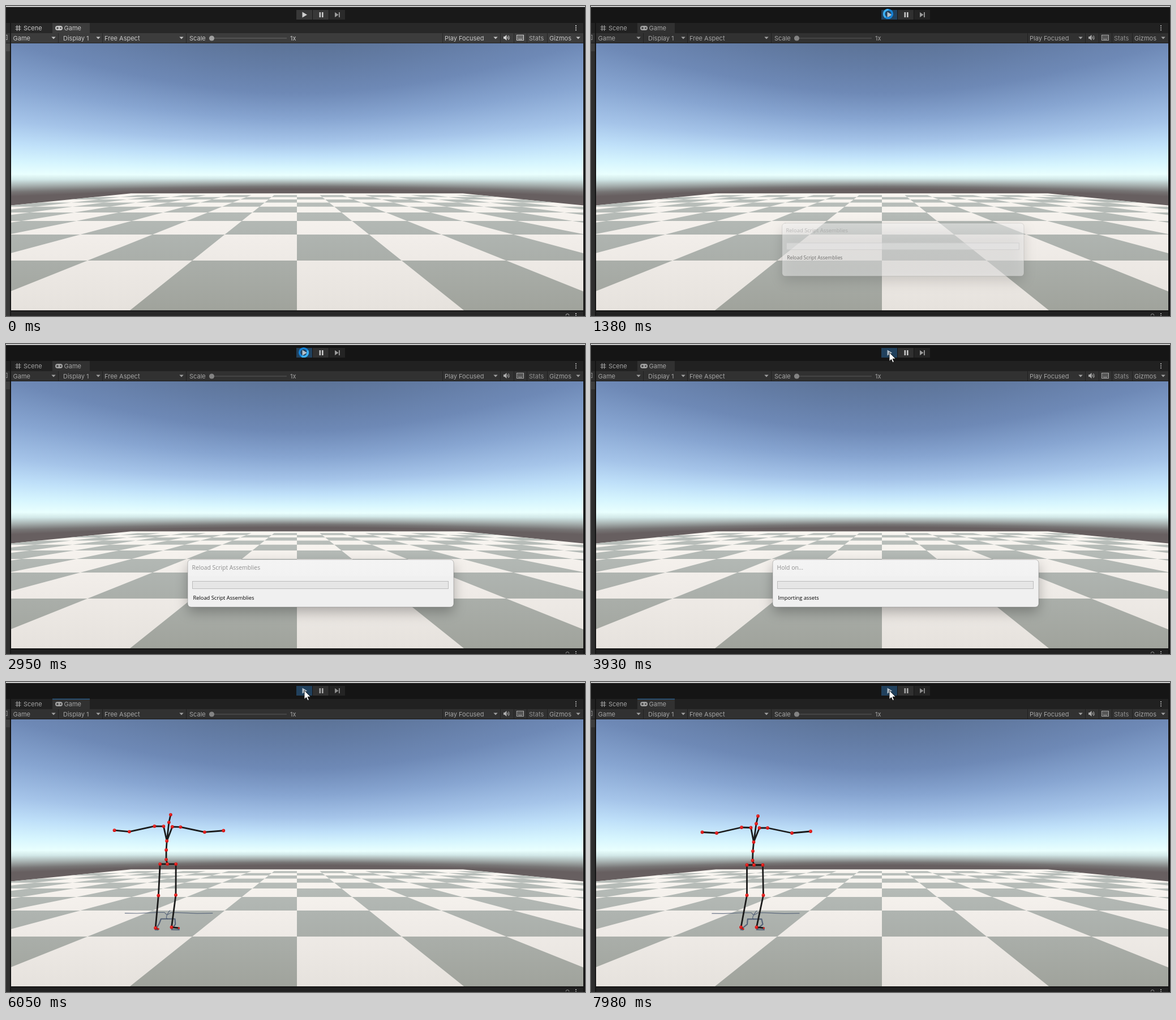
Recreate the animation shown at these times as an HTML page with a canvas. Size 1023x548 px, loop 8 s.

```html
<!DOCTYPE html>
<html lang="en">
<head>
<meta charset="utf-8">
<title>Game view</title>
<style>
html, body { margin: 0; width: 100%; height: 100%; overflow: hidden; background: #191919; }
canvas { display: block; }
</style>
</head>
<body>
<canvas id="stage" width="1023" height="548"></canvas>
<script>
const W = 1023, H = 548, LOOP = 8000;
const VIEW = { x: 9, y: 66, w: 1011, h: 472 };
const CX = 514, HORIZON = 302, FOCAL = 409;
const UI_FONT = '11px Inter, "Liberation Sans", sans-serif';
const ctx = document.getElementById('stage').getContext('2d');

const clamp = v => Math.max(0, Math.min(1, v));
const mix = (a, b, p) => a + (b - a) * p;
const smooth = p => p * p * (3 - 2 * p);

function rect(g, x, y, w, h, color) {
  g.fillStyle = color;
  g.fillRect(x, y, w, h);
}

function poly(g, points, color) {
  g.beginPath();
  points.forEach(([x, y]) => g.lineTo(x, y));
  g.closePath();
  g.fillStyle = color;
  g.fill();
}

function disc(g, x, y, r, color) {
  g.beginPath();
  g.arc(x, y, r, 0, 7);
  g.fillStyle = color;
  g.fill();
}

function text(g, str, x, y, color = '#c8c8c8', font = UI_FONT) {
  g.font = font;
  g.fillStyle = color;
  g.fillText(str, x, y);
}

function vertical(g, y0, y1, stops) {
  const grad = g.createLinearGradient(0, y0, 0, y1);
  stops.forEach(([y, c]) => grad.addColorStop(y, c));
  return grad;
}

// Sky: each column is the middle one stretched about the horizon.
const SKY = [
  [66, '#5c7397'], [110, '#647da6'], [154, '#6e89b6'], [200, '#87a5d1'],
  [240, '#a5c4e9'], [265, '#bfe0f9'], [285, '#d6f5fe'], [299, '#e9fffe'],
  [305, '#d2e8e8'], [312, '#a7b1b0'], [319, '#777575'], [324, '#675f60'], [362, '#675f60']
].map(([y, c]) => [(y - 66) / 296, c]);

function drawSky(g) {
  for (let x = VIEW.x; x < VIEW.x + VIEW.w; x++) {
    const s = Math.hypot(FOCAL, x - CX) / FOCAL;
    g.fillStyle = vertical(g, HORIZON - 236 * s, HORIZON + 60 * s, SKY);
    g.fillRect(x, VIEW.y, 1, VIEW.h);
  }
}

function drawFloor(g) {
  const light = vertical(g, 331, 538, [[0, '#f9f6f1'], [0.4, '#f1ede9'], [1, '#e6e2dd']]);
  const dark = vertical(g, 331, 538, [[0, '#bac0bc'], [0.4, '#aeb3af'], [1, '#a0a39c']]);
  const depth = n => 1 / (0.006757 + 0.00304 * n);
  const at = (col, d) => [CX + col * 1.25 * d, HORIZON + d];
  poly(g, [at(-8, depth(9)), at(8, depth(9)), at(8, depth(-1)), at(-8, depth(-1))], light);
  for (let row = 0; row < 9; row++) {
    const near = depth(row - 1), far = depth(row);
    for (let col = -8; col < 8; col++)
      if ((row + col) & 1)
        poly(g, [at(col, far), at(col + 1, far), at(col + 1, near), at(col, near)], dark);
  }
}

function caret(g, x, y = 54.5) {
  poly(g, [[x - 3.7, y], [x + 3.7, y], [x, y + 4]], '#c4c4c4');
}

function menuDots(g, x, y) {
  for (let i = 0; i < 3; i++) rect(g, x - 1, y + i * 3.7, 2, 2, '#c4c4c4');
}

function drawTabIcons(g) {
  g.strokeStyle = '#c4c4c4';
  g.lineWidth = 1.2;
  g.beginPath();
  for (const d of [-2, 2]) {
    g.moveTo(21.5 + d, 34); g.lineTo(21.5 + d, 44);
    g.moveTo(16.5, 39 + d); g.lineTo(26.5, 39 + d);
  }
  g.stroke();
  g.beginPath();
  g.roundRect(87, 35, 13, 8, 4);
  g.fillStyle = '#c4c4c4';
  g.fill();
  rect(g, 89, 38.4, 4, 1.2, '#3c3c3c');
  rect(g, 90.4, 37, 1.2, 4, '#3c3c3c');
  disc(g, 96.5, 39, 1.3, '#3c3c3c');
}

function drawToolIcons(g) {
  poly(g, [[879, 54], [881, 54], [884.5, 51], [884.5, 61], [881, 58], [879, 58]], '#d0d0d0');
  g.strokeStyle = '#d0d0d0';
  g.lineWidth = 1.1;
  for (const r of [2.3, 4.6]) {
    g.beginPath();
    g.arc(884.5, 56, r, -0.9, 0.9);
    g.stroke();
  }
  g.strokeRect(902.5, 51.5, 12, 9);
  for (let y = 53; y < 58; y += 2)
    for (let x = 904; x < 914; x += 2.3) rect(g, x, y, 1.3, 1.2, '#c4c4c4');
  rect(g, 905, 58.4, 7, 1, '#c4c4c4');
}

function drawChrome(g) {
  rect(g, 0, 0, W, VIEW.y, '#191919');
  rect(g, 0, 0, W, 1.6, '#f0f0f0');
  rect(g, 0, 30, 7, 18, '#282828');
  rect(g, 9, 30, 1011, 18, '#282828');
  rect(g, 82, 30, 66, 18, '#3c3c3c');
  rect(g, 0, 48, 7, H - 48, '#383838');
  rect(g, 0, 66, 7, 14, '#4a4a4a');
  rect(g, 0, 65, 7, 1, '#202020');
  rect(g, 7, 30, 2, H - 30, '#191919');
  rect(g, 9, 48, 1011, 17, '#3c3c3c');
  rect(g, 9, 65, 1011, 1, '#232323');
  rect(g, 1020, 30, 3, H - 30, '#191919');
  rect(g, 9, 538, 1011, 2, '#191919');
  rect(g, 9, 540, 1011, 8, '#282828');
  for (const x of [92, 170, 318, 771, 873, 897, 920, 956]) rect(g, x, 48, 1, 17, '#272727');

  g.strokeStyle = '#b0b0b0';
  g.lineWidth = 1;
  g.strokeRect(-3, 51.5, 5, 8);
  g.beginPath();
  g.arc(992, 547, 2.8, Math.PI, 0);
  g.stroke();
  menuDots(g, 1007, 543);
  menuDots(g, 1007, 34);

  drawTabIcons(g);
  text(g, 'Scene', 31, 43);
  text(g, 'Game', 102.5, 43);
  const labels = [['Game', 12.5], ['Display 1', 101], ['Free Aspect', 174], ['Scale', 324], ['1x', 502],
    ['Play Focused', 775], ['Stats', 924], ['Gizmos', 960]];
  labels.forEach(([s, x]) => text(g, s, x, 60.5, s === 'Stats' ? '#b0b0b0' : '#c8c8c8'));
  [84, 163, 310, 865, 1011].forEach(x => caret(g, x));
  rect(g, 363, 56.3, 133, 1.2, '#646464');
  disc(g, 363.5, 57, 4.6, '#a0a0a0');
  drawToolIcons(g);
}

function makeBackground() {
  const layer = document.createElement('canvas');
  layer.width = W;
  layer.height = H;
  const g = layer.getContext('2d');
  drawSky(g);
  g.save();
  g.beginPath();
  g.rect(VIEW.x, VIEW.y, VIEW.w, VIEW.h);
  g.clip();
  drawFloor(g);
  g.restore();
  drawChrome(g);
  return layer;
}

function drawTint() {
  ctx.fillStyle = 'rgba(0,0,0,.18)';
  ctx.fillRect(0, 3, W, 63);
  ctx.fillRect(0, 66, 9, 482);
  ctx.fillRect(1020, 66, 3, 482);
  ctx.fillRect(9, 538, 1011, 10);
}

function drawPlayControls(playing, running) {
  rect(ctx, 513, 7, 28, 17, playing ? '#21415d' : '#383838');
  rect(ctx, 542, 7, 28, 17, playing ? '#303030' : '#383838');
  rect(ctx, 571, 7, 28, 17, playing ? '#242424' : '#2a2a2a');
  const bright = running ? '#a6a6a6' : '#c8c8c8';
  const dim = running ? '#8c8c8c' : '#9c9c9c';
  poly(ctx, [[523.5, 10.5], [532, 15.5], [523.5, 20.5]], playing ? '#b4c0ca' : '#d0d0d0');
  rect(ctx, 553.5, 11, 2.6, 9, bright);
  rect(ctx, 558, 11, 2.6, 9, bright);
  poly(ctx, [[581, 11], [587.5, 15.5], [581, 20]], dim);
  rect(ctx, 588, 11, 1.8, 9, dim);
}

function drawDialog(title, message, p) {
  const s = mix(0.85, 1, p), h = p < 1 ? 103 : 84;
  ctx.save();
  ctx.globalAlpha = clamp(p * 1.3);
  ctx.translate(321 + 183 * (1 - s), 381 + 32 * (1 - s));
  ctx.scale(s, s);
  ctx.beginPath();
  ctx.roundRect(0, 0, 470, h, 6);
  ctx.save();
  ctx.shadowColor = 'rgba(0,0,0,.28)';
  ctx.shadowBlur = 22;
  ctx.shadowOffsetY = 9;
  ctx.fillStyle = vertical(ctx, 0, 84, [[0, '#f4f4f4'], [0.34, '#f2f2f2'], [0.36, '#f0f0f0'], [1, '#f0f0f0']]);
  ctx.fill();
  ctx.restore();
  ctx.strokeStyle = 'rgba(90,90,90,.45)';
  ctx.lineWidth = 0.8;
  ctx.stroke();
  text(ctx, title, 7.5, 17.5, '#8f8f8f', '10.4px "Open Sans", "Noto Sans", sans-serif');
  rect(ctx, 8, 38, 453, 14, '#e6e6e6');
  ctx.strokeStyle = '#bcbcbc';
  ctx.lineWidth = 1;
  ctx.strokeRect(8.5, 38.5, 452, 13);
  text(ctx, message, 9.5, 70.5, '#000', '9.3px "Open Sans", "Noto Sans", sans-serif');
  ctx.restore();
}

// Joints: x, y, then the full drift of the sway.
const JOINTS = [
  [290, 234, 5, 3], [287, 247.5, 5, 3], [283.5, 280.5, 4, 2.5],
  [282.5, 296.5, 3.5, 2.5], [282.5, 313.5, 3, 2], [284.5, 321.5, 3.5, 2],
  [277.5, 254.5, 5, 3], [261.5, 254.5, 4.5, 2.5], [217, 264, 5, 3], [190.5, 261.5, 6, 4],
  [293, 255.5, 4.5, 2.5], [307.5, 256, 4.5, 2], [350, 265, 5, 2], [383.5, 262.5, 4.5, 1.5],
  [271.5, 321.5, 4, 2], [268, 377.5, 7.5, -0.5], [264, 435, 1, -1.5], [269, 436.5, 0, 0],
  [299.5, 321.5, 4, 2], [299, 376.5, 5.5, 0.5], [292.5, 433.5, 0, 0], [305.5, 435, 0, 0]
];
const LIMBS = [[0, 1, 2, 3, 4, 5], [2, 6, 7, 8, 9], [2, 10, 11, 12, 13], [5, 14, 15, 16, 17], [5, 18, 19, 20, 21]];

function strokeLimbs(points, limbs, color, width) {
  ctx.strokeStyle = color;
  ctx.lineWidth = width;
  ctx.beginPath();
  limbs.forEach(limb => limb.forEach((j, i) => ctx[i ? 'lineTo' : 'moveTo'](...points[j])));
  ctx.stroke();
}

function drawFigure(t) {
  const w = t < 6050 ? 0.18 * (t - 4660) / 1390 : 0.18 + 0.82 * ((t - 6050) / 1930) ** 1.5;
  const pose = JOINTS.map(([x, y, dx, dy]) => [x + dx * w, y + dy * w]);
  const shadow = pose.map(([x, y]) => {
    const sy = 438 - (435 - y) * 0.17;
    return [286 + (x - 286) * (sy - HORIZON) / 133, sy];
  });
  ctx.lineJoin = ctx.lineCap = 'round';
  strokeLimbs(shadow, LIMBS.slice(0, 3), 'rgba(66,80,108,.75)', 1.2);
  strokeLimbs(shadow, LIMBS.slice(3), 'rgba(66,80,108,.8)', 2.2);
  strokeLimbs(pose, LIMBS, '#1b1b1b', 2.8);
  pose.forEach(([x, y], i) => {
    const r = i === 17 || i === 21 ? 1.6 : 2.9;
    disc(ctx, x, y, r, '#d81414');
    disc(ctx, x - 0.5, y - 0.8, r * 0.45, '#f43a34');
  });
}

function drawArrow(x, y) {
  const shape = [[0, 0], [0, 15.5], [3.6, 12.2], [6, 17.7], [8.4, 16.6], [6.1, 11.2], [11, 11.2]];
  const points = shape.map(([px, py]) => [x + px, y + py]);
  poly(ctx, points, '#fff');
  ctx.lineJoin = 'miter';
  ctx.strokeStyle = '#111';
  ctx.lineWidth = 0.9;
  ctx.stroke();
}

function drawSpinner(x, y, t) {
  const turn = t / 1000 * Math.PI * 2;
  ctx.lineCap = 'round';
  ctx.lineWidth = 3.4;
  ctx.strokeStyle = '#1583d8';
  ctx.beginPath();
  ctx.arc(x, y, 7.4, 0, 7);
  ctx.stroke();
  ctx.strokeStyle = '#3fb2f5';
  ctx.beginPath();
  ctx.arc(x, y, 7.4, turn, turn + 2.2);
  ctx.stroke();
}

function drawPointer(t) {
  if (t < 200) return;
  if (t >= 1100 && t < 3660) {
    const p = clamp((t - 1380) / 400);
    return drawSpinner(mix(525, 526, p), mix(14, 15, p), t);
  }
  if (t >= 3660) return drawArrow(527, 15);
  const p = smooth(clamp((t - 170) / 790)), q = 1 - p;
  const curve = (a, b, c, d) => q * q * q * a + 3 * q * q * p * b + 3 * q * p * p * c + p * p * p * d;
  drawArrow(curve(878, 700, 390, 525), curve(518, 450, 200, 14));
}

const background = makeBackground();

function draw() {
  const t = performance.now() % LOOP;
  const playing = t >= 1030;
  ctx.drawImage(background, 0, 0);
  if (playing) drawTint();
  drawPlayControls(playing, t >= 4460);
  if (t >= 4300) rect(ctx, 82, 29.5, 66, 1.5, '#2c5d87');
  if (t >= 1310 && t < 3660)
    drawDialog('Reload Script Assemblies', 'Reload Script Assemblies', clamp((t - 1310) / 180));
  else if (t >= 3660 && t < 4390)
    drawDialog('Hold on...', 'Importing assets', clamp((4390 - t) / 160));
  if (t >= 4660) drawFigure(t);
  drawPointer(t);
  requestAnimationFrame(draw);
}
draw();
</script>
</body>
</html>
```
